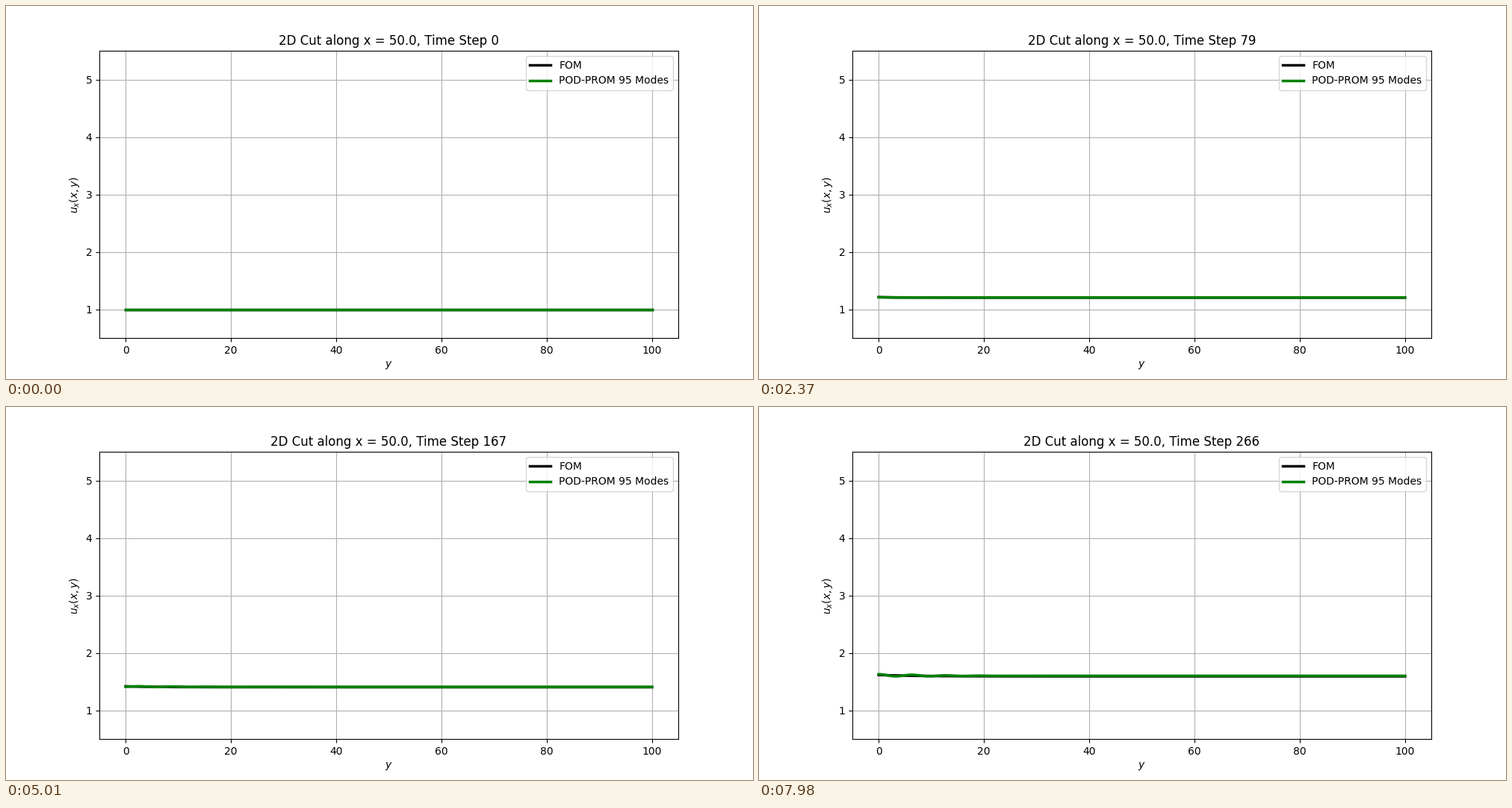
Write a matplotlib script that moves like this. It is 1000 px wide and 500 px high and loops after 8000 ms.

```python
import numpy as np
import matplotlib.pyplot as plt
from matplotlib.animation import FuncAnimation

LOOP_MS, TICK_MS, STEP_MS = 8000, 20, 30
DT = 0.05               # simulated time per step
T_END = 13.3
PX = 1 / 77             # one pixel in data units

y = np.linspace(0, 100, 501)


def level(t):
    """Burgers flow driven by an exponential source, slowed by advection."""
    return 1 + 0.02 * np.e * t - 0.00075 * t ** 2


def wall_rise(t):
    return 0.0018 * t * np.exp(-y / (2.5 + 0.35 * t))


def full_model(t):
    return level(t) + wall_rise(t)


def reduced_model(t):
    # Waves creep away from y = 0 while the whole cut drifts up and down.
    crest = 0.75 * (t - T_END)
    ripple = 1.3 * (t / T_END) ** 2 * np.exp(-(y / 13) ** 2) \
        * np.cos(2 * np.pi * (y - crest) / 6.4)
    drift = 0.055 * t * np.sin(np.pi * (t - 11.7) / 2.5)
    return level(t) + 0.5 * wall_rise(t) + PX * (ripple + drift)


fig, ax = plt.subplots(figsize=(10, 5), dpi=100)
fom, = ax.plot(y, full_model(0), color="black", linewidth=2.5, label="FOM")
rom, = ax.plot(y, reduced_model(0), color="green", linewidth=2.5,
               label="POD-PROM 95 Modes")
ax.set_xlim(-5, 105)
ax.set_ylim(0.5, 5.5)
ax.set_xlabel("$y$")
ax.set_ylabel("$u_x(x,y)$")
ax.grid(True)
ax.legend(loc="upper right")
title = ax.set_title("")


def update(frame):
    # Half a tick ahead, so each step shows from its due time on.
    step = (frame * TICK_MS + TICK_MS // 2) // STEP_MS
    t = step * DT
    fom.set_ydata(full_model(t))
    rom.set_ydata(reduced_model(t))
    title.set_text(f"2D Cut along x = 50.0, Time Step {step}")
    return fom, rom, title


anim = FuncAnimation(fig, update, frames=LOOP_MS // TICK_MS,
                     interval=TICK_MS, repeat=True, repeat_delay=0)
plt.show()
```
